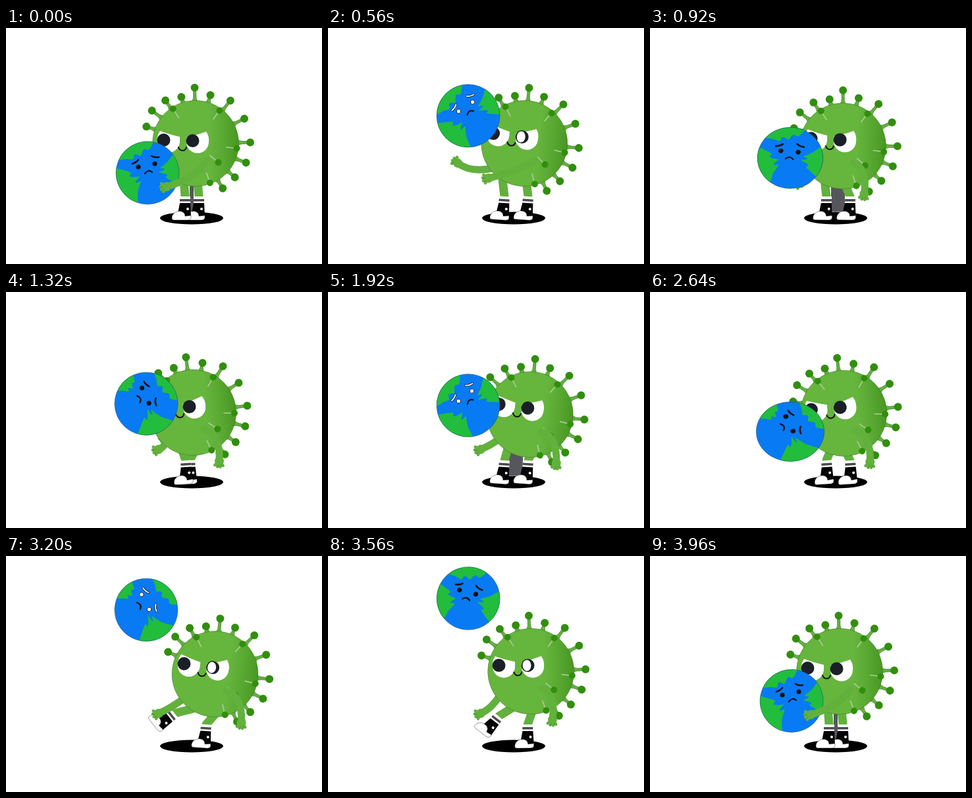
An HTML page for the animation above (4000 ms loop, 480 by 360 pixels).

```html
<!DOCTYPE html>
<html lang="en">
<head>
<meta charset="utf-8">
<title>Virus juggling the globe</title>
<style>
html, body { margin: 0; width: 100%; height: 100%; overflow: hidden; background: #fff; }
svg { display: block; width: 100%; height: 100%; }
</style>
</head>
<body>
<svg viewBox="0 0 480 360">
  <defs>
    <linearGradient id="skin">
      <stop offset=".66" stop-color="#66b53d"/>
      <stop offset=".82" stop-color="#58a832"/>
      <stop offset="1" stop-color="#489722"/>
    </linearGradient>
    <clipPath id="disc"><circle r="48"/></clipPath>
  </defs>
  <ellipse cx="282" cy="290" rx="48" ry="9.5"/>
  <g id="scene"></g>
</svg>
<script>
const LOOP = 4000, BEAT = 587;
const TOSS = 200, FIRST = 880, LAST = FIRST + 3 * BEAT, KICK = 2940, CATCH = 3900;
const SKIN = '#62b13d', KNOB = '#318e0e', INK = '#1b2028';
const scene = document.getElementById('scene');

const clamp = (v, lo, hi) => Math.min(hi, Math.max(lo, v));
const mix = (a, b, u) => a + (b - a) * u;
const mixAll = (a, b, u) => a.map((v, i) => mix(v, b[i], u));
const bell = u => Math.exp(-u * u);
const polar = (deg, r) => [r * Math.cos(deg * Math.PI / 180), r * Math.sin(deg * Math.PI / 180)];
function ramp(t, a, b) {
  const u = clamp((t - a) / (b - a), 0, 1);
  return u * u * (3 - 2 * u);
}
// Sideways rocking, one cycle for about two bounces
const rock = t => Math.cos(2 * Math.PI * (t - 640) / 1280);

const circle = (x, y, r, fill, extra = '') => `<circle cx="${x}" cy="${y}" r="${r}" fill="${fill}" ${extra}/>`;
const path = (d, fill, extra = '') => `<path d="${d}" fill="${fill}" ${extra}/>`;
const line = (d, color, w) => path(d, 'none', `stroke="${color}" stroke-width="${w}" stroke-linecap="round" stroke-linejoin="round"`);
const group = (move, inner) => `<g transform="${move}">${inner}</g>`;

// Angle and reach of each knob
const SPIKES = [[-161, 79], [-143, 83], [-125, 80], [-107, 74], [-91, 85], [-73, 77],
  [-51, 84], [-27, 83], [-1, 83], [21, 82], [41, 79], [59, 80]];
const STUDS = [[-123, 63], [-54, 62], [7, 63], [40, 45], [70, 64]];

const spike = ([turn, r]) => group(`rotate(${turn})`,
  path(`M61-7Q66-2.4 70-2.2L${r}-2V2L70 2.2Q66 2.4 61 7Z`, SKIN, 'stroke="#2f5f1c" stroke-width=".5"') +
  circle(r, 0, 6, KNOB));
const stud = ([turn, r]) => group(`rotate(${turn})`,
  line(`M${r} 0H${r - 16}`, '#a9cf98', 1.6) + circle(r, 0, 5, KNOB));

const bodyArt = SPIKES.map(spike).join('') +
  circle(0, 0, 65.5, 'url(#skin)', 'stroke="#3c6f24" stroke-width=".5"') +
  STUDS.map(stud).join('');

const shoeArt =
  path('M-8 0H8V11H-8Z', '#fff') + path('M-8 4H8V7.5H-8Z', '#4a4a4e') +
  path('M-8 10H8L9 31H-12Z', '#050505') +
  path('M-20 33C-20 26-13 21-5 23Q0 25 0 30L9 29V33Q8 36 4 36H-17Q-20 36-20 33Z', '#fff', 'stroke="#111" stroke-width=".4"') +
  circle(4, 19, 2, '#fff');

const leg = (hx, hy, [x, y, turn]) => line(`M${hx} ${hy}L${x} ${y}`, SKIN, 13) +
  group(`translate(${x} ${y}) rotate(${turn})`, shoeArt);

function arm(x, y, [hx, hy, ex, ey]) {
  const turn = Math.atan2(hy - ey, hx - ex) * 180 / Math.PI;
  const fingers = [-42, -13, 16, 45].map(a => group(`rotate(${a})`, line('M3 0H9', SKIN, 4.6))).join('');
  return line(`M${x} ${y}Q${ex} ${ey} ${hx} ${hy}`, SKIN, 11) +
    group(`translate(${hx} ${hy}) rotate(${turn})`,
      circle(0, 0, 7, SKIN) + fingers + line('M5-3L8-4M6 1L9 2', '#3f8a22', .8));
}

function eye(x, y, flip, pale) {
  const pupil = circle(-7.5, -1, 10, INK) +
    (pale ? '<ellipse cx="-9" cy="-1" rx="6.5" ry="8.5" fill="#fff"/>' : '');
  return group(`translate(${x} ${y})`,
    group(`scale(${flip} 1)`, path('M-17-6Q0-10 13-15Q18-8 17 1A17 17 0 0 1-17 1Z', '#fff')) + pupil);
}

const virus = (x, y, tilt, lift, pale) => group(`translate(${x} ${y}) rotate(${tilt})`,
  bodyArt + group(`translate(0 ${lift})`,
    eye(-41, -4, -1, false) + eye(3, -3, 1, pale) + line('M-26 6Q-24 11-20 11Q-15 11-14 6', '#111', 2)));

// Angle on the rim, half span, depth, growth as the globe rolls
const LAND = [[242, 39, 18, -.1], [-8, 28, 27, .32], [148, 41, 31, -.5]];

function land([angle, span, depth, grow], roll) {
  const size = 1 + grow * roll, points = [];
  for (let u = -1; u <= 1.01; u += .125) {
    const dent = Math.sqrt(Math.max(0, 1 - u * u)) + .18 * Math.sin(3 * Math.PI * u);
    points.push(polar(angle + span * size * u, 49 - depth * size * dent));
  }
  const rim = [span, 0, -span].map(a => polar(angle + a * size, 75));
  return path(`M${[...points, ...rim].join('L')}Z`, '#22bd3c');
}

function globeFace(roll, pale) {
  const dot = (x, y) => pale ? circle(x, y, 3.2, '#fff', 'stroke="#111" stroke-width=".8"') : circle(x, y, 3.6, '#111');
  const brow = d => line(d, '#111', pale ? 3.2 : 2.6) + (pale ? line(d, '#fff', 1.8) : '');
  return group(`translate(${-11 * roll} ${10 * roll})`,
    dot(-14, -9) + dot(11, -14) + brow('M-23-14Q-17-16-14-20') + brow('M6-26Q10-23 17-24') +
    line('M-4 1Q1-6 7-1', '#111', 2.2));
}

function globe(x, y, turn, squash, pale) {
  const roll = turn / 78;
  return group(`translate(${x} ${y}) scale(${1 + .078 * squash} ${1 - .053 * squash}) rotate(${turn})`,
    `<g clip-path="url(#disc)">${circle(0, 0, 48, '#087af4')}${LAND.map(p => land(p, clamp(roll, 0, 1))).join('')}</g>` +
    circle(0, 0, 48, 'none', 'stroke="#1b4a52" stroke-width=".5"') + globeFace(roll, pale));
}

const hop = (u, y0, y1, height) => mix(y0, y1, u) - 4 * height * u * (1 - u);

function ballHeight(t) {
  if (t < TOSS) return mix(221, 225, ramp(t, 0, TOSS));
  if (t < FIRST) return hop((t - TOSS) / (FIRST - TOSS), 225, 213, 85);
  if (t < LAST) return hop((t - FIRST) / BEAT % 1, 213, 213, 57);
  if (t < KICK) return 213;
  return hop(Math.min(1, (t - KICK) / (CATCH - KICK)), 213, 221, 168);
}

function ballSquash(t) {
  if (t > LAST) return bell(Math.max(0, t - KICK + 20) / 50);
  const n = Math.max(0, Math.round((t - FIRST) / BEAT));
  return bell((t - FIRST - n * BEAT) / 50);
}

function draw(t) {
  const play = ramp(t, 100, 500) * (1 - ramp(t, 3500, CATCH));
  const sway = play * rock(t);

  const x = 288 + play * 20 * (t / 3200) ** 1.5 + 9.5 * sway;
  const y = 176 + play * 11 * Math.max(0, Math.sin(Math.PI * (t - 560) / 3000));

  const ballY = ballHeight(t), high = ballY < 140;
  const turn = ramp(t, 100, 500) * (1 - ramp(t, 3100, 3850)) * (26 - 52 * rock(Math.min(t, 2560)));

  const kick = ramp(t, LAST + 100, KICK) * (1 - ramp(t, 3480, 3720));
  const cross = bell((t - 1320) / 150);
  const left = mixAll([272 - 4 * play + 5 * cross, 257, 4 * sway], [256, 240, 52], kick);
  const right = [293 + play * (11 - 25 * cross), 257, 4 * sway];

  const hug = 1 - ramp(t, 560, 1000) + ramp(t, 3500, 3880);
  const reach = bell((t - 560) / 230);
  const rightArm = mixAll([x + 40, y + 74, x + 42, y + 34], [244, 242 - 13 * reach, 286, 231 - 12 * reach], hug);
  const leftArm = mixAll([232, 240, 247, 234], [197, 206, 216, 221], reach);

  const gap = !high && sway > -.1
    ? path(`M${left[0] + 7} 238H${right[0] - 8}V280H${left[0] + 7}Z`, '#55575c') : '';

  scene.innerHTML = gap +
    leg(x + 3, y + 58, right) + leg(x - 18 - 8 * (play + sway), y + 53, left) +
    arm(x - 48, y + 38, leftArm) +
    virus(x, y, 6.3 * sway, -5.5 * play, high) +
    globe(215 - 2 * play, ballY, turn, ballSquash(t), sway > .8) +
    arm(x + 17, y + 26, rightArm);
}

const start = performance.now();
function tick() {
  draw((performance.now() - start) % LOOP);
  requestAnimationFrame(tick);
}
tick();
</script>
</body>
</html>
```
